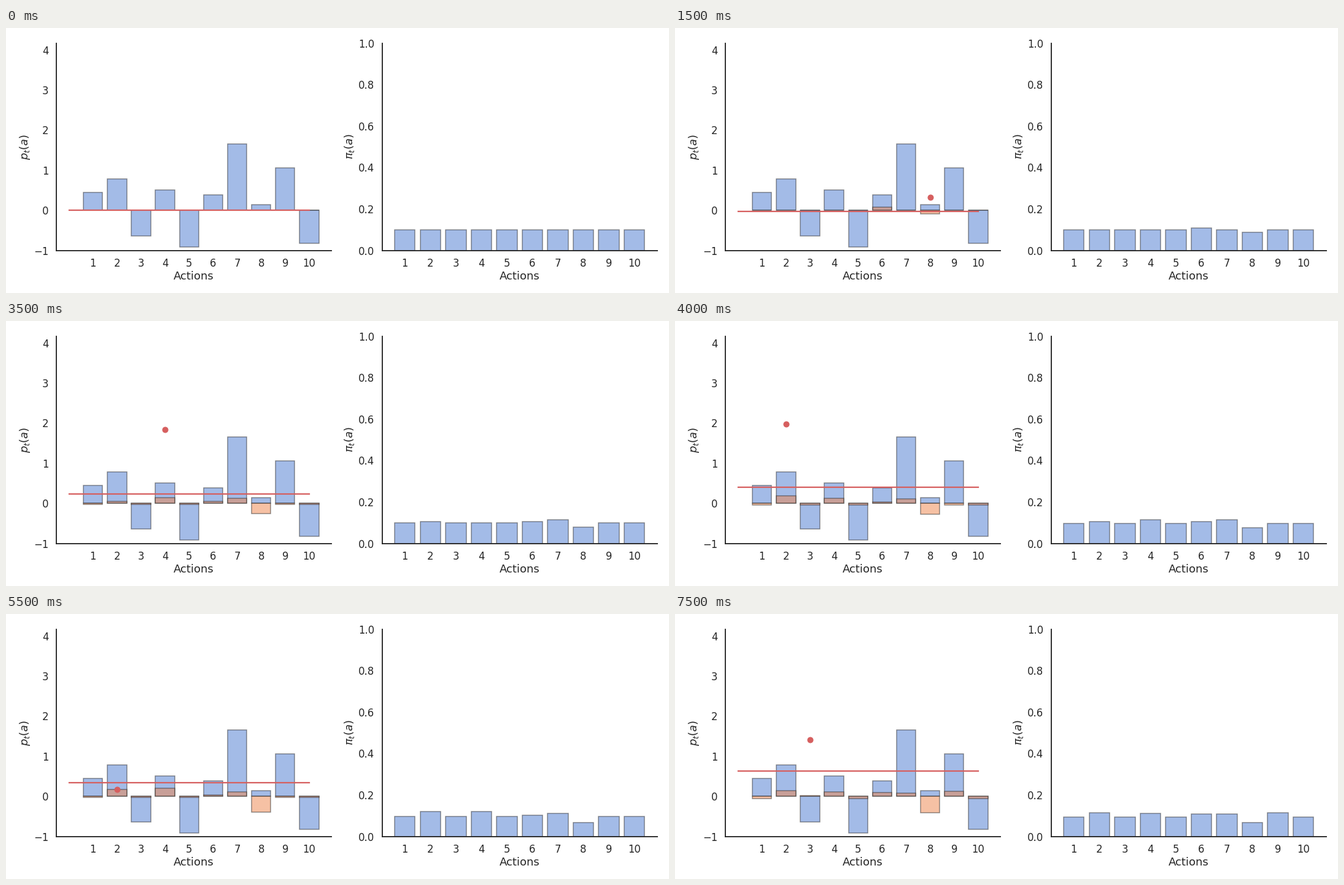
Write a matplotlib script that moves like this. It is 1080 by 432 pixels and loops after 8 s.

```python
import numpy as np
import matplotlib.pyplot as plt
from matplotlib.animation import FuncAnimation

W, H, DPI = 1080, 432, 72
BLUE, ORANGE, RED, INK = "#4878d0", "#ee854a", "#d65f5f", "0.15"
STEP = 0.1

plt.rcParams.update({
    "font.family": "DejaVu Sans", "mathtext.fontset": "dejavusans",
    "axes.linewidth": 1.875, "axes.edgecolor": INK, "axes.labelcolor": INK,
    "axes.labelsize": 18, "xtick.color": INK, "ytick.color": INK,
    "xtick.labelsize": 16.5, "ytick.labelsize": 16.5,
})

# The bandit: mean reward of each arm, then the arms pulled and what they paid
arms = np.arange(1, 11)
means = [0.445, 0.785, -0.64, 0.51, -0.915, 0.385, 1.655, 0.14, 1.06, -0.82]
pulled = [8, 6, 8, 7, 2, 8, 4, 2, 4, 8, 2, 9, 6, 4, 3]
rewards = [-1.45, 0.68, 0.32, 1.63, 0.89, -1.45, 1.84, 1.98, 1.21,
           -0.85, 0.17, 2.4, 1.41, -0.12, 1.41]


def softmax(x):
    e = np.exp(x - x.max())
    return e / e.sum()


def learn():
    """Yield preferences, policy, baseline and last pull after each step."""
    prefs, base = np.zeros(len(arms)), 0.0
    yield prefs, softmax(prefs), base, ([], [])
    for arm, reward in zip(pulled, rewards):
        policy = softmax(prefs)
        base += STEP * (reward - base)
        prefs = prefs + STEP * (reward - base) * ((arms == arm) - policy)
        yield prefs, policy, base, ([arm], [reward])


history = list(learn())

fig = plt.figure(figsize=(W / DPI, H / DPI), dpi=DPI, facecolor="white")


def make_axes(left, ylim, ylabel):
    ax = fig.add_axes([left / W, 69.4 / H, 447.65 / W, 338 / H])
    ax.set(ylim=ylim, xticks=arms, ylabel=ylabel)
    ax.set_xlabel("Actions", labelpad=3)
    ax.spines[["top", "right"]].set_visible(False)
    ax.tick_params(axis="x", length=0, pad=12)
    ax.tick_params(axis="y", length=0, pad=12.5)
    return ax


def draw_bars(ax, heights, color):
    return ax.bar(arms, heights, 0.8, color=color, edgecolor=INK,
                  linewidth=1.5, alpha=0.5)


def set_heights(bars, heights):
    for bar, h in zip(bars, heights):
        bar.set_height(h)


ax_pref = make_axes(82.25, (-1, 4.17), "$p_t(a)$")
ax_prob = make_axes(612.91, (0, 1), r"$\pi_t(a)$")
ax_pref.set_yticks(range(-1, 5))

draw_bars(ax_pref, means, BLUE)
pref_bars = draw_bars(ax_pref, np.zeros(len(arms)), ORANGE)
prob_bars = draw_bars(ax_prob, np.zeros(len(arms)), BLUE)
base_line, = ax_pref.plot([0, 10], [0, 0], color=RED, lw=2.25)
dot, = ax_pref.plot([], [], "o", color=RED, ms=9, mew=1)
ax_pref.set_xlim(-0.52, 10.92)
ax_prob.set_xlim(0.11, 10.89)


def update(i):
    prefs, policy, base, pull = history[i]
    set_heights(pref_bars, prefs)
    set_heights(prob_bars, policy)
    base_line.set_ydata([base, base])
    dot.set_data(*pull)
    return [*pref_bars, *prob_bars, base_line, dot]


anim = FuncAnimation(fig, update, frames=len(history), interval=500,
                     repeat=True, repeat_delay=0, blit=False)
plt.show()
```
